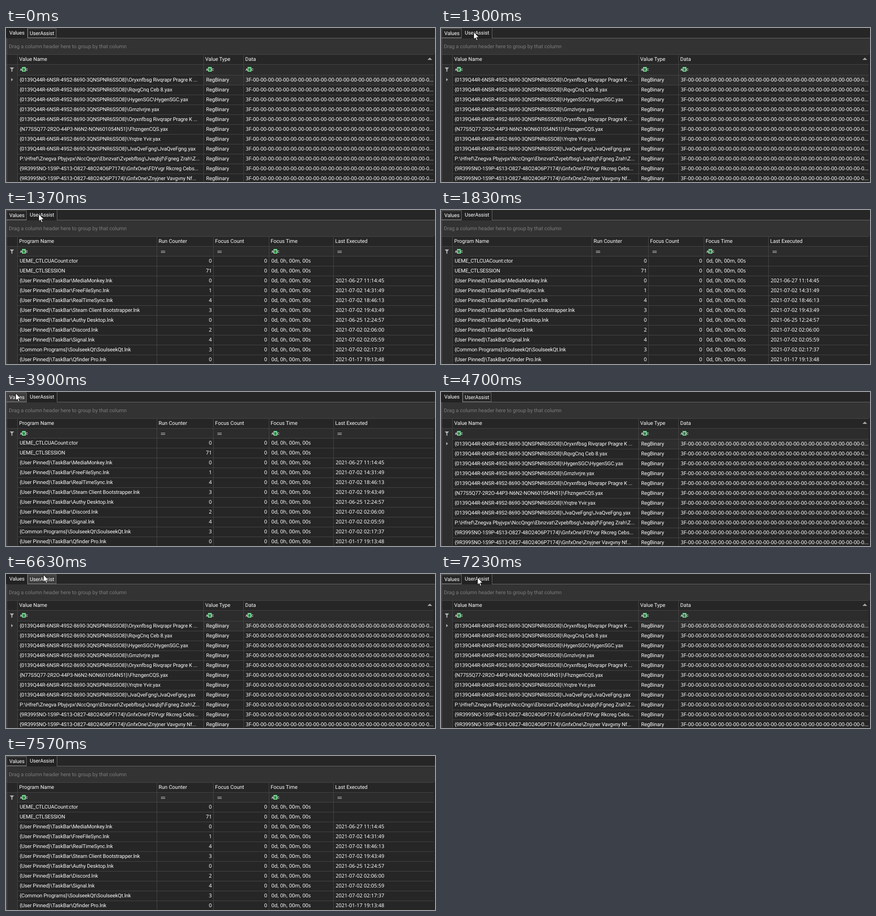
Animation, 911 px wide and 328 px high, one loop 8 s. Source, as an HTML page:

```html
<!DOCTYPE html>
<html lang="en">
<head>
<meta charset="utf-8">
<title>Registry values</title>
<style>
  html, body { margin: 0; width: 100%; height: 100%; overflow: hidden; background: #262626; }
  svg { display: block; width: 911px; height: 328px; }
  text {
    font: 11px Roboto, "Liberation Sans", sans-serif;
    fill: #fff;
    white-space: pre;
    text-rendering: geometricPrecision;
  }
  text.name { letter-spacing: -.1px; }
  text.num { font-family: "Noto Sans", "Open Sans", sans-serif; letter-spacing: -.04px; }
  text.hint { fill: #7d7d7d; }
  text.abc { font-size: 7px; font-weight: 700; fill: #ddd; }
  text.abc.mid { fill: #153d20; }
</style>
</head>
<body>
<svg id="stage" viewBox="0 0 911 328"></svg>
<script>
const LOOP = 8000;
const LINE = '#464646';
const EDGE = '#6a6a6a';
const RIGHT = 908;
const stage = document.getElementById('stage');

function add(parent, tag, attrs = {}, content = '') {
  const el = document.createElementNS('http://www.w3.org/2000/svg', tag);
  for (const key in attrs) el.setAttribute(key, attrs[key]);
  el.textContent = content;
  parent.append(el);
  return el;
}
const group = (parent = stage) => add(parent, 'g');
const rect = (p, x, y, width, height, fill) => add(p, 'rect', { x, y, width, height, fill });
const path = (p, d, fill) => add(p, 'path', { d, fill });
const label = (p, x, middle, str, cls = '', anchor = 'start') =>
  add(p, 'text', { x, y: middle + 4, class: cls, 'text-anchor': anchor }, str);

function abcIcon(p, x) {
  rect(p, x + 4, 83, 8, 10, '#6fd08c');
  [['A', 2], ['B', 8], ['C', 14]].forEach(([ch, dx]) =>
    add(p, 'text', { x: x + dx, y: 90.5, class: ch === 'B' ? 'abc mid' : 'abc', 'text-anchor': 'middle' }, ch));
}
function equalsIcon(p, x) {
  rect(p, x, 87, 9, 1, '#d5d5d5');
  rect(p, x, 90, 9, 1, '#d5d5d5');
}

// Columns: [separator x, title, filter icon, icon x]
function drawGrid(columns, firstLine) {
  const g = group();
  rect(g, 2, 56, RIGHT - 2, 272, '#262626');
  rect(g, 2, 77, RIGHT - 2, firstLine - 77, '#2c2c2c');
  rect(g, 2, 77, 22, 251, '#2e2e2e');
  for (let y = firstLine; y < 328; y += 21) rect(g, 25, y, RIGHT - 25, 1, LINE);
  [56, 77].forEach(y => rect(g, 2, y, RIGHT - 2, 1, LINE));
  columns.forEach(([sep, title, icon, iconX]) => {
    rect(g, sep, 56, 1, 272, LINE);
    label(g, sep + 4, 66, title);
    icon(g, iconX);
  });
  path(g, 'M8 84h9l-3.5 4v5h-2v-5z', '#b4b4b4');
  return g;
}

function drawValues() {
  const g = drawGrid([
    [24, 'Value Name', abcIcon, 30],
    [419, 'Value Type', abcIcon, 425],
    [504, 'Data', abcIcon, 509]
  ], 100);
  rect(g, 420, 101, 84, 20, '#2e2e2e');
  rect(g, 505, 101, RIGHT - 505, 20, '#2e2e2e');
  path(g, 'M895 68h10l-5-5z', '#a6a6a6');
  path(g, 'M11 106.5v7l4-3.5z', '#a6a6a6');

  const programs = '{0139Q44R-6NSR-49S2-8690-3QNSPNR6SSO8}\\';
  const pinned = '{9R3995NO-1S9P-4S13-O827-48O24O6P7174}\\GnfxOne\\';
  const names = [
    programs + 'Oryxnfbsg Rivqrapr Pragre K ...',
    programs + 'RqvgCnq Ceb 8.yax',
    programs + 'HygenSGC\\HygenSGC.yax',
    programs + 'GrnzIvrjre.yax',
    programs + 'Oryxnfbsg Rivqrapr Pragre K ...',
    '{N77S5Q77-2R2O-44P3-N6N2-NON601054N51}\\FhzngenCQS.yax',
    programs + 'Yrqtre Yvir.yax',
    programs + 'JvaQveFgng\\JvaQveFgng.yax',
    'P:\\Hfref\\Znegva Pbyjvpx\\NccQngn\\Ebnzvat\\Zvpebfbsg\\Jvaqbjf\\Fgneg Zrah\\Z...',
    pinned + 'FDYvgr Rkcreg Cebs...',
    pinned + 'Znyjner Vavgvny Nf...'
  ];
  const data = '3F-' + '00-'.repeat(23) + '0...';
  names.forEach((name, i) => {
    const y = 110 + 21 * i;
    label(g, 29, y, name, 'name');
    label(g, 425, y, 'RegBinary', 'name');
    label(g, 509, y, data, 'num');
  });
  return g;
}

function drawAssist() {
  const g = drawGrid([
    [24, 'Program Name', abcIcon, 30],
    [320, 'Run Counter', equalsIcon, 329],
    [440, 'Focus Count', equalsIcon, 449],
    [558, 'Focus Time', abcIcon, 564],
    [695, 'Last Executed', equalsIcon, 704]
  ], 98);
  const bar = '{User Pinned}\\TaskBar\\';
  [
    ['UEME_CTLCUACount:ctor', 0, ''],
    ['UEME_CTLSESSION', 71, ''],
    [bar + 'MediaMonkey.lnk', 0, '2021-06-27 11:14:45'],
    [bar + 'FreeFileSync.lnk', 1, '2021-07-02 14:31:49'],
    [bar + 'RealTimeSync.lnk', 4, '2021-07-02 18:46:13'],
    [bar + 'Steam Client Bootstrapper.lnk', 3, '2021-07-02 19:43:49'],
    [bar + 'Authy Desktop.lnk', 0, '2021-06-25 12:24:57'],
    [bar + 'Discord.lnk', 2, '2021-07-02 02:06:00'],
    [bar + 'Signal.lnk', 4, '2021-07-02 02:05:59'],
    ['{Common Programs}\\SoulseekQt\\SoulseekQt.lnk', 3, '2021-07-02 02:17:37'],
    [bar + 'Qfinder Pro.lnk', 0, '2021-01-17 19:13:48']
  ].forEach(([name, runs, date], i) => {
    const y = 108 + 21 * i;
    label(g, 29, y, name, 'name');
    label(g, 437, y, runs, 'num', 'end');
    label(g, 554.5, y, 0, 'num', 'end');
    label(g, 563.5, y, '0d, 0h, 00m, 00s', 'num');
    label(g, 700, y, date, 'num');
  });
  return g;
}

// A tab has a flat selected look and a boxed look that lights up on hover.
function makeTab(title, textX, [selX, selW], [boxX, boxW]) {
  const selected = group(), boxed = group();
  rect(selected, selX, 0, selW, 22, '#222');
  rect(selected, selX + selW - 1, 0, 1, 22, EDGE);
  label(selected, textX, 10, title, 'name');
  const box = add(boxed, 'rect', { x: boxX + .5, y: 1.5, width: boxW - 1, height: 19, stroke: EDGE });
  label(boxed, textX, 11, title, 'name');
  return (isSelected, isHovered) => {
    selected.style.display = isSelected ? '' : 'none';
    boxed.style.display = isSelected ? 'none' : '';
    box.setAttribute('fill', isHovered ? '#3d3d3d' : '#262626');
  };
}

rect(stage, 0, 0, 911, 328, '#262626');
rect(stage, 1, 22, 910, 34, '#333');
rect(stage, 0, 21, 911, 1, EDGE);
rect(stage, 1, 21, 1, 307, EDGE);
label(stage, 6, 39, 'Drag a column header here to group by that column', 'hint');

const tables = { values: drawValues(), assist: drawAssist() };
const tabs = {
  values: makeTab('Values', 7, [1, 45], [1, 43]),
  assist: makeTab('UserAssist', 50.5, [44, 65], [46, 61])
};
const cursor = group();
add(cursor, 'path', {
  d: 'M.5 .5V16L4 12.8 6.6 18.5 9 17.5 6.5 12H11.5Z',
  fill: '#fff', stroke: '#000', 'stroke-width': .9
});

// Steps: [start ms, selected tab, visible table, cursor position]
const V = 'values', A = 'assist';
const steps = [
  [0, V, V], [500, V, V, [64, 0]], [570, V, V, [67, 4]], [630, V, V, [69, 7]],
  [770, V, V, [69, 8]], [1300, A, V, [69, 8]], [1370, A, A, [69, 8]],
  [1770, A, A, [71, 3]], [1830, A, A],
  [3900, A, A, [20, 2]], [3970, A, A, [22, 5]], [4100, V, A, [22, 5]], [4170, V, V, [22, 5]],
  [4570, V, V, [20, 4]], [4630, V, V, [17, 2]], [4700, V, V],
  [6630, V, V, [79, 1]], [6700, V, V, [78, 4]], [6770, V, V, [77, 6]], [6830, V, V, [77, 7]],
  [7230, A, V, [77, 7]], [7300, A, A, [77, 7]], [7500, A, A, [78, 8]], [7570, A, A]
];

let shown;
function show(step) {
  if (step === shown) return;
  shown = step;
  const [, tab, table, pos] = step;
  const hovered = pos && (pos[0] < 44 ? V : A);
  for (const key in tabs) {
    tabs[key](key === tab, key === hovered);
    tables[key].style.display = key === table ? '' : 'none';
  }
  cursor.style.display = pos ? '' : 'none';
  if (pos) cursor.setAttribute('transform', `translate(${pos})`);
}

const start = performance.now();
function tick() {
  const time = (performance.now() - start) % LOOP;
  show(steps.findLast(step => step[0] <= time));
  requestAnimationFrame(tick);
}
tick();
</script>
</body>
</html>
```
